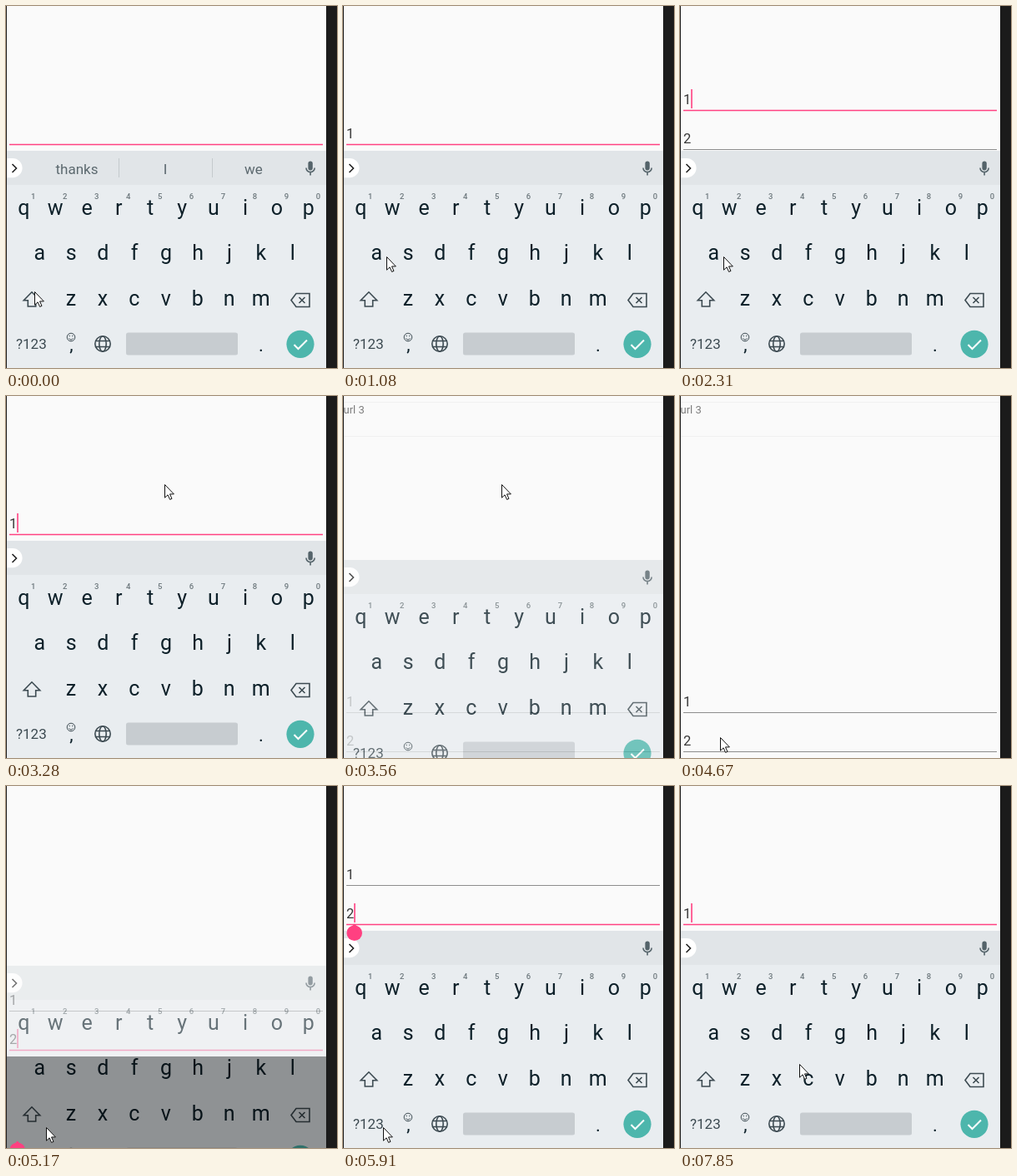
Write an HTML page that moves like this. It is 397 by 435 pixels and loops after 8000 ms.

```html
<!DOCTYPE html>
<html lang="en">
<head>
<meta charset="utf-8">
<title>Keyboard and fields</title>
<style>
html, body { margin: 0; width: 100%; height: 100%; overflow: hidden; background: #fafafa; }
svg { display: block; width: 397px; height: 435px; font-family: Roboto, Arial, sans-serif; }
.key { font-size: 25px; fill: #0d2029; text-anchor: middle; }
.hint { font-size: 9.5px; font-weight: 500; fill: #6c777c; text-anchor: middle; }
.word { font-size: 17px; fill: #5b686e; text-anchor: middle; }
.field { font-size: 16.5px; fill: #383838; }
.icon { fill: none; stroke: #3c4a51; stroke-width: 1.6; }
</style>
</head>
<body>
<svg viewBox="0 0 397 435">
  <defs><clipPath id="clip"><rect id="clipBox" width="397" height="435"/></clipPath></defs>
  <rect width="397" height="435" fill="#000"/>
  <g clip-path="url(#clip)">
    <rect width="397" height="435" fill="#fafafa"/>
    <g id="list">
      <path d="M1 7.5H384M1 48.5H384" stroke="#f0f0f0"/>
      <text x="0.5" y="21" font-size="13" fill="#7c7c7c">url 3</text>
    </g>
    <g id="row1"><text class="field" x="4" y="-7.5">1</text><path d="M4 0H380"/></g>
    <g id="row2"><text class="field" x="4" y="-7.5">2</text><path d="M4 0H380"/></g>
    <rect id="caret" width="1.6" height="23" fill="#ff4081"/>
  </g>

  <g id="board">
    <rect y="174" width="384" height="262" fill="#e9edf0"/>
    <rect y="174" width="384" height="41" fill="#e1e5e8"/>
    <g id="words">
      <text class="word" x="85" y="201.5">thanks</text>
      <text class="word" x="191" y="201.5">I</text>
      <text class="word" x="297" y="201.5">we</text>
      <path d="M135.5 183V206M247.5 183V206" stroke="#c4cacd"/>
    </g>
    <path d="M0 183H8a11.6 11.6 0 0 1 0 23.2H0z" fill="#fff"/>
    <path d="M7.5 190l5 5-5 5" class="icon" style="stroke:#222"/>
    <rect x="362.4" y="186.5" width="5.4" height="11" rx="2.7" fill="#54636a"/>
    <path d="M360 194.5a5.1 5.1 0 0 0 10.2 0M365.1 199.5V203.5" class="icon" style="stroke:#54636a"/>
    <g id="keys"></g>
    <path d="M31 343.8L21.3 353.7H26.3V361H35.7V353.7H40.7z" class="icon"/>
    <path d="M342 353.5L348 345.5H364V361.5H348zM351.5 350l7 7m0-7l-7 7" class="icon"/>
    <text x="12" y="412" font-size="17" fill="#3c4a51">?123</text>
    <g class="icon" style="stroke-width:1">
      <circle cx="78" cy="398" r="4.8"/>
      <path d="M75.3 399.3q2.7 3.4 5.4 0M76.2 395.7v1.5M79.8 395.7v1.5"/>
    </g>
    <text class="key" x="78.5" y="414" style="font-size:22px">,</text>
    <g class="icon">
      <circle cx="116" cy="406" r="9.2"/>
      <ellipse cx="116" cy="406" rx="4.2" ry="9.2"/>
      <path d="M108 402.5H124M108 409.5H124"/>
    </g>
    <rect x="144" y="392.5" width="134" height="27" rx="2.5" fill="#c7ccd0"/>
    <text class="key" x="306" y="415" style="font-size:22px">.</text>
    <circle cx="353" cy="406.3" r="16.6" fill="#4db6ac"/>
    <path d="M345.5 407l5 5 10.5-10.5" fill="none" stroke="#fff" stroke-width="2"/>
  </g>

  <g id="handle" fill="#ff4081">
    <circle cx="13.7" cy="176.7" r="9.3"/>
    <path d="M13.7 165.5l6.8 6.8h-13.6z"/>
  </g>
  <path id="mouse" d="M.5 .5V16.2L4.1 12.8L6.6 18.4L9 17.4L6.5 11.9H11.4z" fill="#fff" stroke="#111"/>
  <rect width="1" height="435" fill="#222"/>
  <rect x="384" width="13" height="435" fill="#1b1b1b"/>
</svg>
<script>
const LOOP = 8000, PINK = '#ff4081';
const FULL = 435, REST = 174;        // window height without and with the keyboard
const ROW = 47, BLINK = 445;
const HIDE = 3560, TAP = 5020, BACK = 6620;
const TYPED = [950, 2160];           // when each field gets its digit

// Focus changes: [ms, field]; each one restarts the caret blink.
const FOCUS = [[-600, 1], [1200, 2], [2310, 1], [HIDE, 0], [TAP, 2], [BACK, 1]];
// Pointer legs: [start ms, end ms, x, y]
const LEGS = [[150, 550, 52, 301], [2860, 3280, 190, 106], [3860, 4520, 48, 410], [7480, 7850, 143, 334]];

const $ = id => document.getElementById(id);
const ramp = (t, a, b) => Math.min(1, Math.max(0, (t - a) / (b - a)));
const smooth = (t, a, b) => { const p = ramp(t, a, b); return p * p * (3 - 2 * p); };
const easeOut = (t, a, b) => 1 - (1 - ramp(t, a, b)) ** 2;
const show = (el, on) => el.setAttribute('visibility', on ? 'visible' : 'hidden');
const move = (el, x, y) => el.setAttribute('transform', `translate(${x} ${y})`);

const label = (kind, x, y, s) => `<text class="${kind}" x="${x}" y="${y}">${s}</text>`;
const keyRow = (kind, s, x, y) => [...s].map((c, i) => label(kind, x + i * 37.95, y, c)).join('');
$('keys').innerHTML = keyRow('key', 'qwertyuiop', 21.3, 251) + keyRow('key', 'asdfghjkl', 40.3, 305) +
  keyRow('key', 'zxcvbnm', 78, 360) + keyRow('hint', '1234567890', 32.8, 232);

function pointer(t) {
  let x = 34, y = 343;
  for (const [a, b, toX, toY] of LEGS) {
    const p = smooth(t, a, b);
    x += (toX - x) * p;
    y += (toY - y) * p;
  }
  return [x, y];
}

function drawRow(n, y, typed, focused) {
  const [text, line] = $('row' + n).children;
  move($('row' + n), 0, y);
  show(text, typed);
  line.setAttribute('stroke', focused ? PINK : '#8c8c8c');
  line.setAttribute('stroke-width', focused ? 1.6 : 1);
}

function draw(t) {
  const [since, focus] = FOCUS.filter(f => f[0] <= t).pop();
  const typed = TYPED.map(ms => t >= ms);
  const empty = focus > 0 && !typed[focus - 1];

  const height = t < HIDE ? REST : Math.round(FULL - (FULL - REST) * smooth(t, 4946, 5450));
  const scroll = Math.round(ROW * (1 - ramp(t, 1160, 1320) + smooth(t, 2230, 2580)
    - (t >= HIDE) + smooth(t, 6560, 6770)));
  const lines = [1, 0].map(i => height - 7.5 - i * ROW + scroll);

  $('clipBox').setAttribute('height', height);
  move($('list'), 0, height - FULL);
  lines.forEach((y, i) => drawRow(i + 1, y, typed[i], focus === i + 1));

  show($('caret'), focus && Math.floor((t - since) / BLINK) % 2 === 0);
  if (focus) move($('caret'), empty ? 4.2 : 13.2, lines[focus - 1] - 25.5);

  const shown = 1 - ramp(t, 3520, 3710) + easeOut(t, 5000, 5450);
  $('board').setAttribute('opacity', shown);
  move($('board'), 0, Math.round(108 * (1 - shown)));
  show($('words'), empty);

  // The handle only catches up once the window has nearly settled.
  show($('handle'), t >= TAP && t < BACK);
  move($('handle'), 0, (t < TAP + 300 ? FULL : height) - REST);
  move($('mouse'), ...pointer(t));
}

const start = performance.now();
function tick() {
  draw((performance.now() - start) % LOOP);
  requestAnimationFrame(tick);
}
draw(0);
requestAnimationFrame(tick);
</script>
</body>
</html>
```
